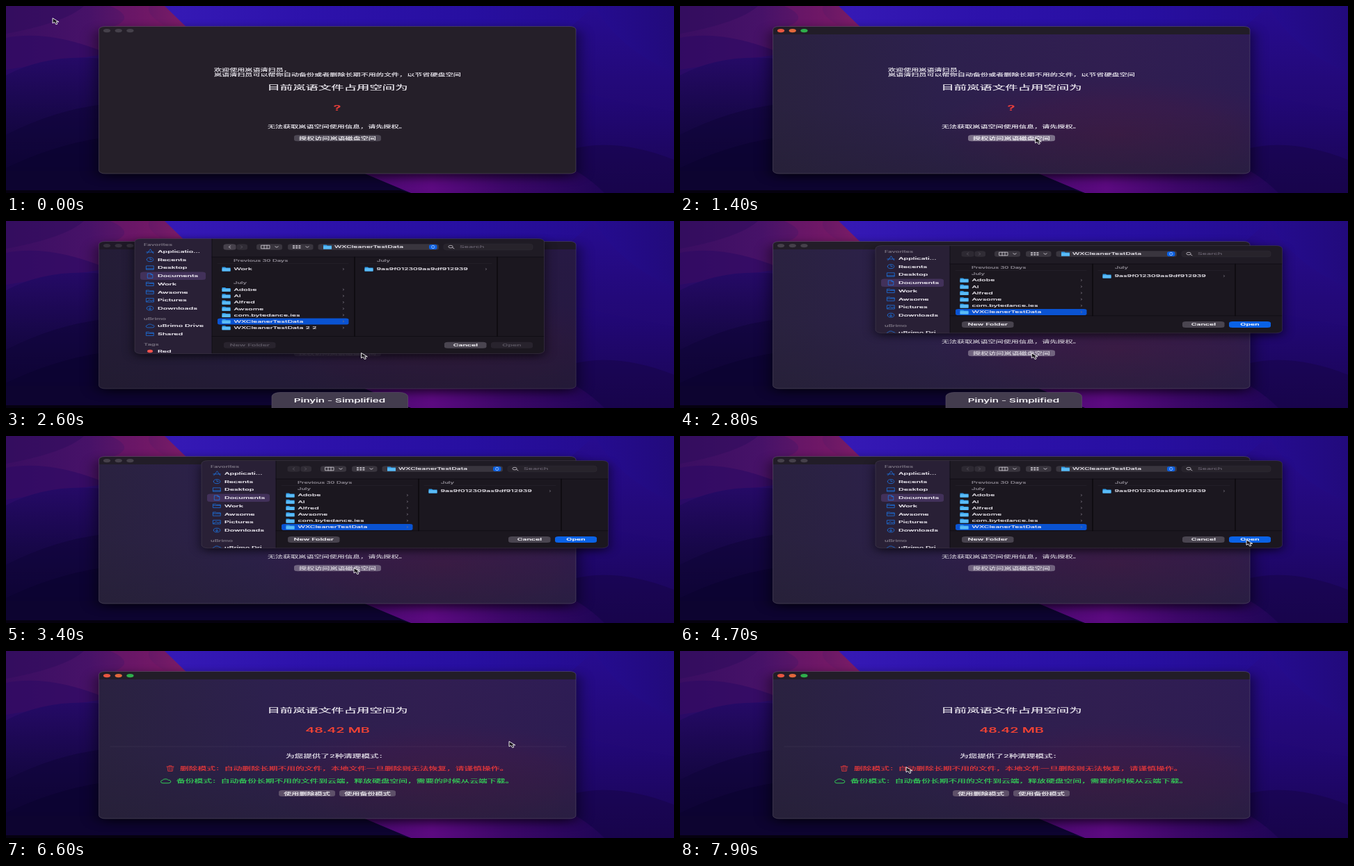
Animation, 960 px wide and 270 px high, one loop 8000 ms. Source, as an HTML page:

```html
<!DOCTYPE html>
<html lang="zh">
<head>
<meta charset="utf-8">
<title>Disk space cleaner</title>
<style>
html, body { margin: 0; width: 100%; height: 100%; overflow: hidden; background: #12063f; }
svg { display: block; width: 960px; height: 270px; }
text { font-family: Inter, "Noto Sans CJK SC", "Noto Sans CJK", sans-serif; white-space: pre; stroke-width: .14px; }
.mid { text-anchor: middle; }
</style>
</head>
<body>
<svg id="stage" viewBox="0 0 960 270" xmlns="http://www.w3.org/2000/svg"></svg>
<script>
const LOOP = 8000;
const BLUE = '#1c78ea';

// The screen is twice as wide as it should be, so all glyphs share one 2:1 scale.
const txt = (x, y, s, size, fill, attrs = '') =>
  `<text transform="translate(${x} ${y + size * 0.365}) scale(2 1)" font-size="${size}" fill="${fill}" stroke="${fill}" ${attrs}>${s}</text>`;
const mid = (x, y, s, size, fill, attrs = '') => txt(x, y, s, size, fill, 'class="mid" ' + attrs);
const box = (x, y, w, h, fill, r = 0, attrs = '') =>
  `<rect x="${x}" y="${y}" width="${w}" height="${h}" rx="${r}" ry="${r / 2}" fill="${fill}" ${attrs}/>`;
const shape = (d, fill, attrs = '') => `<path d="${d}" fill="${fill}" ${attrs}/>`;
const line = (d, color, width = 0.8) =>
  `<path d="${d}" fill="none" stroke="${color}" stroke-width="${width}" stroke-linejoin="round" stroke-linecap="round"/>`;
const at = (x, y, body) => `<g transform="translate(${x} ${y})">${body}</g>`;
const group = (id, body, attrs = '') => `<g id="${id}" ${attrs}>${body}</g>`;
const stops = list => list.map(([o, c, a = 1]) =>
  `<stop offset="${o}" stop-color="${c}" stop-opacity="${a}"/>`).join('');
const linear = (id, list, down) =>
  `<linearGradient id="${id}" x2="${down ? 0 : 1}" y2="${down ? 1 : 0}">${stops(list)}</linearGradient>`;
const radial = (id, cx, cy, r, list) =>
  `<radialGradient id="${id}" cx="${cx}" cy="${cy}" r="${r}">${stops(list)}</radialGradient>`;
const blur = (id, sd) =>
  `<filter id="${id}" x="-10%" y="-25%" width="120%" height="150%"><feGaussianBlur stdDeviation="${sd}"/></filter>`;
const clip = (id, body) => `<clipPath id="${id}">${body}</clipPath>`;

const OVAL = 'M-5 0a5 3.1 0 1 0 10 0a5 3.1 0 1 0 -10 0';
const FRAME = 'M-5.5 -2.8H5.5V2.8H-5.5z';
const ICON = {
  app: 'M-4.5 3L.5 -3.5L5 3M-5.5 1H5.5',
  clock: OVAL + 'M0 -2V0H2.5',
  desk: FRAME + 'M-5.5 1.4H5.5',
  doc: 'M-3.5 -3.5H1L4 -1.8V3.5H-3.5zM1 -3.5V-1.8H4',
  folder: 'M-5.5 -2.7H-1.5L-.5 -1.8H5.5V2.8H-5.5zM-5.5 -.6H5.5',
  pic: FRAME + 'M-5 2L-1 -.5L2 1.2L4 0L5.5 1',
  down: OVAL + 'M0 -1.6V1.5M-2 .4L0 1.6L2 .4',
  cloud: 'M-4.2 2.7a2.7 1.8 0 0 1 .2 -3.5a4 2.5 0 0 1 7.3 -.3a2.6 1.9 0 0 1 .9 3.8z',
  trash: 'M-5 -2.6H5M-2 -2.8V-3.8H2V-2.8M-4 -2.4L-3.2 3.8H3.2L4 -2.4M-1.3 -1V2.4M1.3 -1V2.4'
};
const icon = (name, x, y, color, k = 1) => at(x, y, `<g transform="scale(${k})">${line(ICON[name], color)}</g>`);
const folder = (x, y) => at(x, y,
  shape('M0 -2.9h4.4l1.5 .9h6.1v5.1h-12z', '#2f9be8') + box(0, -1.2, 12, 4.3, '#5bbcf7', 1));
const chev = (x, y, dir, color, k = 1) =>
  line(`M${x - dir * 1.3 * k} ${y - 1.7 * k}l${dir * 2.8 * k} ${1.7 * k}l${-dir * 2.8 * k} ${1.7 * k}`, color, 0.7);
const caret = (x, y) => line(`M${x - 2.2} ${y - 0.7}l2.2 1.4l2.2 -1.4`, '#d6d2da', 0.8);

function wallpaper() {
  return box(0, 0, 960, 270, 'url(#sky)')
    + shape('M846 0Q880 62 960 96V270H800V40z', 'url(#east)')
    + shape('M0 0H228L262 33L190 62L0 92z', 'url(#rose)')
    + shape('M0 0H112Q86 24 0 40z', '#2e0c5c', 'opacity=".5"')
    + shape('M150 0H206Q200 14 234 31H150Q190 18 150 0z', '#841a66', 'opacity=".3"')
    + shape('M0 46Q60 34 140 66V110H0z', '#300b64', 'opacity=".7"')
    + shape('M0 100Q60 68 140 76V270H0z', 'url(#west)')
    + shape('M0 186Q70 150 140 142V270H0z', '#10053a', 'opacity=".55"')
    + shape('M0 234Q70 200 140 190V270H0z', '#0a0330', 'opacity=".6"')
    + shape('M815 122Q880 138 960 152V270H500V238z', 'url(#dusk)')
    + shape('M815 206Q880 190 960 222V270H720z', '#170447', 'opacity=".5"')
    + shape('M0 238H508L582 270H0z', '#0d0430')
    + shape('M506 238L582 270H860Q840 250 819 238z', 'url(#plum)')
    + shape('M0 266H566L582 270H0z', '#05010f');
}

const windowBox = (fill, attrs = '') => box(133.5, 29.5, 685.5, 212.5, fill, 9, attrs);
const lights = colors => colors.map((c, i) =>
  `<ellipse cx="${145 + i * 16.7}" cy="35.6" rx="5.1" ry="2.6" fill="${c}"/>`).join('');
const button = (x, y, w, label, fill, attrs = '') =>
  box(x, y - 4.5, w, 9, fill, 5, attrs) + mid(x + w / 2, y, label, 5.55, '#f8f6fa');

function appWindow() {
  const frost = windowBox('url(#frost)') + windowBox('url(#glow)') + windowBox('url(#shade)')
    + shape('M133.5 41V34Q133.5 29.5 142 29.5H810Q819 29.5 819 34V41z', '#221d28');
  return windowBox('#000', 'opacity=".7" filter="url(#wide-soft)" transform="translate(0 5)"')
    + group('flat', windowBox('#251f29'))
    + group('frost-body', `<g clip-path="url(#win)">${frost}</g>`)
    + windowBox('none', 'stroke="#77727e" stroke-opacity=".55" stroke-width=".7"')
    + group('lights-off', lights(['#45404a', '#45404a', '#45404a']))
    + group('lights-on', lights(['#ea5640', '#e2683c', '#2fae4b']));
}

function firstPage() {
  const c = '#f0edf4';
  return txt(299, 92, '欢迎使用岚语清扫员，', 5.55, c)
    + txt(299, 98.7, '岚语清扫员可以帮你自动备份或者删除长期不用的文件，以节省硬盘空间', 5.55, c)
    + mid(476.5, 118, '目前岚语文件占用空间为', 9.2, c)
    + mid(476, 147, '?', 10, '#f4403a', 'font-weight="600"')
    + txt(376, 173.5, '无法获取岚语空间使用信息，请先授权。', 5.55, c)
    + button(414, 190.7, 125, '授权访问岚语磁盘空间', '#4c4753', 'id="grant"');
}

function secondPage() {
  const c = '#f0edf4', red = '#f03a3a', green = '#34d958';
  return mid(476.5, 86, '目前岚语文件占用空间为', 9.2, c)
    + mid(476.5, 114.8, '48.42 MB', 9.9, '#f64434', 'font-weight="500"')
    + line('M150 138H805', 'rgba(255,255,255,.07)', 0.7)
    + txt(402, 152, '为您提供了2种清理模式：', 6.3, c)
    + icon('trash', 236, 169.6, red)
    + txt(250, 169.8, '删除模式：自动删除长期不用的文件，本地文件一旦删除则无法恢复，请谨慎操作。', 6.39, red)
    + icon('cloud', 229.5, 187.6, green, 1.15)
    + txt(245, 187.6, '备份模式：自动备份长期不用的文件到云端，释放硬盘空间，需要的时候从云端下载。', 6.39, green)
    + button(392, 205.5, 81, '使用删除模式', '#5e5069')
    + button(479, 205.5, 81, '使用备份模式', '#5e5069');
}

const SIDE = [
  ['app', '', 18.5], ['clock', 'Recents', 30.2], ['desk', 'Desktop', 42], ['doc', 'Documents', 53.7],
  ['folder', 'Work', 65.4], ['folder', 'Awsome', 77.1], ['pic', 'Pictures', 88.8], ['down', 'Downloads', 100.5],
  ['cloud', '', 125.8], ['folder', 'Shared', 137.4]
];
const FILES = ['Adobe', 'AI', 'Alfred', 'Awsome', 'com.bytedance.ies', 'WXCleanerTestData', 'WXCleanerTestData 2 2'];

function sidebar(x, y, w, names) {
  const head = (s, dy) => txt(x + 13, y + dy, s, 4.7, '#77707f', 'font-weight="500"');
  let out = box(x, y, w, 170, '#292036') + box(x + 8, y + 48, w - 17, 11.4, '#42315a', 5) + head('Favorites', 8.7);
  let spare = 0;
  for (const [name, label, dy] of SIDE)
    out += icon(name, x + 22, y + dy, BLUE, 0.95)
      + txt(x + 33, y + dy, label || names[spare++], 5.35, '#f0edf4', 'font-weight="500"');
  return out + head('uBrimo', 116) + head('Tags', 152.6)
    + `<ellipse cx="${x + 22}" cy="${y + 162.5}" rx="4" ry="2.2" fill="#f4524d"/>`
    + txt(x + 33, y + 162.5, 'Red', 5.35, '#f0edf4', 'font-weight="500"');
}

function toolbar(m, y, ready) {
  const c = y + 12, field = '#39353e';
  let out = box(m + 16.5, c - 4.3, 18, 8.6, ready ? '#2d2932' : '#46414b', 5)
    + box(m + 35.5, c - 4.3, 15.5, 8.6, '#302c35', 5)
    + chev(m + 25.5, c, -1, ready ? '#5b5660' : '#c9c5cd') + chev(m + 42.5, c, 1, '#5b5660')
    + box(m + 64, c - 4.3, 37, 8.6, field, 5) + box(m + 109, c - 4.3, 36.5, 8.6, field, 5)
    + line(`M${m + 71} ${c - 2.3}h12v4.6h-12zm4 0v4.6m4 -4.6v4.6`, '#d6d2da', 0.8)
    + caret(m + 93, c) + caret(m + 137, c);
  for (let i = 0; i < 6; i++)
    out += box(m + 116 + i % 3 * 4.2, c - 2.3 + (i > 2 ? 2.7 : 0), 3, 1.7, '#c4c0c8');
  return out + box(m + 152.5, c - 4.3, 173.5, 8.6, field, 5) + folder(m + 160, c)
    + txt(m + 176, c, 'WXCleanerTestData', 5.25, '#f0edf4')
    + box(m + 312, c - 3.6, 11.5, 7.2, '#0b5fe0', 4)
    + line(`M${m + 315.5} ${c - 0.8}l2.2 -1.3l2.2 1.3m-4.4 1.6l2.2 1.3l2.2 -1.3`, '#fff', 0.7)
    + box(m + 333, c - 4.3, 128, 8.6, '#27232b', 5, 'stroke="#332e38" stroke-width=".5"')
    + `<ellipse cx="${m + 343}" cy="${c - 0.4}" rx="3.2" ry="1.8" fill="none" stroke="#c9c5cd" stroke-width=".8"/>`
    + line(`M${m + 345.5} ${c + 0.8}l2.5 1.5`, '#c9c5cd')
    + txt(m + 356, c, 'Search', 5.35, '#655f6c');
}

function panel(id, p) {
  const { x, y, m, h, ready } = p, right = m + 477.5, w = right - x, foot = y + h - 25;
  const frame = (fill, attrs = '') => box(x, y, w, h, fill, 9, attrs);
  const head = (hx, hy, s) => txt(hx, hy, s, 4.7, '#8a858f', 'font-weight="500"');
  const row = (rx, ry, s, end) => folder(rx, ry) + txt(rx + 17, ry, s, 5.3, '#f0edf4') + chev(end, ry, 1, '#77727d', 0.6);
  let list = head(m + 31, y + 31.4, 'Previous 30 Days') + head(m + 31, p.july, 'July')
    + box(m + 8, p.first + 41.4, 188.5, 9, '#0a53d2', 4);
  if (!ready) list += row(m + 14.5, y + 44, 'Work', m + 189);
  FILES.slice(0, ready ? 6 : 7).forEach((s, i) => list += row(m + 14.5, p.first + i * 9.2, s, m + 189));
  const push = (bx, bw, s, fill, color) =>
    box(bx, foot + 8.2, bw, 9, fill, 5) + mid(bx + bw / 2, foot + 12.7, s, 5.3, color, 'font-weight="500"');
  const body = frame('#1b171f') + sidebar(x, y, m - x, p.names)
    + box(m, y, 478, 26.5, '#1f1b24') + toolbar(m, y, ready)
    + line(`M${m} ${y + 26.5}H${right}M${m} ${foot}H${right}M${m} ${y}V${y + h}`, '#0f0c12', 0.8)
    + line(`M${m + 205} ${y + 26.5}V${foot}M${m + 410} ${y + 26.5}V${foot}`, '#08060a', 1.2)
    + line(`M${m + 8} ${y + 36}H${m + 196}M${m + 213} ${y + 36}H${m + 402}`, '#29252e', 0.5)
    + list + head(m + 237, y + 31.4, 'July')
    + row(m + 219.5, y + 44, '9as9f012309as9df912939', m + 394)
    + push(m + 17, 74.5, 'New Folder', ready ? '#48434e' : '#28232d', ready ? '#f1eef4' : '#5a5560')
    + push(m + 334, 60.5, 'Cancel', '#4a4550', '#f8f6fa')
    + push(m + 401, 60, 'Open', ready ? '#0a62e6' : '#28232d', ready ? '#fff' : '#5a5560');
  return clip(id + '-clip', frame('#000'))
    + group(id, frame('#000', 'opacity=".65" filter="url(#soft)" transform="translate(0 4)"')
      + `<g clip-path="url(#${id}-clip)">${body}</g>`
      + frame('none', 'stroke="#67606f" stroke-opacity=".5" stroke-width=".6"'));
}

const defs = '<defs>'
  + linear('sky', [[0, '#1d0b6a'], [0.25, '#3519b5'], [0.45, '#2d12ab'], [0.7, '#270fa0'], [0.88, '#250c90'], [1, '#220a7c']])
  + linear('east', [[0, '#270c90'], [0.4, '#23097a'], [1, '#1e0660']], true)
  + linear('rose', [[0, '#3a0e62'], [0.45, '#471268'], [0.8, '#681866'], [1, '#801c66']])
  + linear('west', [[0, '#250a66'], [0.45, '#170748'], [1, '#090327']], true)
  + linear('dusk', [[0, '#22087a'], [1, '#1a0552']], true)
  + linear('plum', [[0, '#46086c'], [0.3, '#5c0a80'], [0.6, '#3c0768'], [1, '#1f0556']])
  + linear('frost', [[0, '#2a2240'], [0.35, '#2d204e'], [0.7, '#311e52'], [1, '#2e1c55']])
  + linear('shade', [[0, '#241f33', 0], [0.55, '#241f33', 0.1], [1, '#241f33', 0.55]], true)
  + radial('glow', 0.72, 0.74, 0.4, [[0, '#4c1744', 0.6], [0.6, '#441848', 0.4], [1, '#3c1850', 0]])
  + clip('win', windowBox('#000'))
  + blur('soft', '9 6') + blur('wide-soft', '13 7') + '</defs>';

const arrow = shape('M0 0V7.4L2.7 5.8L4.7 9L6.9 8.4L5 5.4H8.8z', '#17131b',
  'stroke="#fff" stroke-width=".9" stroke-linejoin="round"');
const resize = shape('M-1 -1.2H4.6V-3L10 .5L4.6 4V2.2H-1z', '#17131b',
  'stroke="#fff" stroke-width=".9" stroke-linejoin="round"');

const stage = document.getElementById('stage');
stage.innerHTML = defs + wallpaper() + appWindow()
  + group('page1', firstPage()) + group('page2', secondPage())
  + group('dim', windowBox('#1c1626', 'opacity=".35"'))
  + panel('wide', { x: 185, y: 25.5, m: 296, h: 166, july: 89, first: 99, ready: false,
      names: ['Applicatio...', 'uBrimo Drive'] })
  + panel('low', { x: 281, y: 35.5, m: 388, h: 126.3, july: 76, first: 85.5, ready: true,
      names: ['Applicati...', 'uBrimo Dri...'] })
  + group('toast', box(382, 247.5, 195.5, 40, '#433c4e', 12, 'stroke="#5e5668" stroke-width=".6"')
      + mid(479.5, 259.6, 'Pinyin - Simplified', 7.6, '#f8f6fa', 'font-weight="500"'))
  + group('cursor', group('arrow', arrow) + group('resize', resize));

const el = id => document.getElementById(id);

// Spans of time, in ms, in which each part is on screen
const SHOWN = {
  'flat': [[0, 1400]],
  'frost-body': [[1400, LOOP]],
  'lights-off': [[0, 1400], [2300, 4900]],
  'lights-on': [[1400, 2300], [4900, LOOP]],
  'page1': [[0, 6500]],
  'page2': [[6500, LOOP]],
  'dim': [[2300, 2700]],
  'wide': [[2300, 2700]],
  'low': [[2700, 4900]],
  'toast': [[1900, 2900]],
  'arrow': [[0, 4900], [5300, LOOP]],
  'resize': [[4900, 5300]]
};

const PATH = [
  [0, 67, 17.5], [1300, 510.5, 190.5], [2600, 510.5, 190.5], [3000, 500, 190.5], [3700, 500, 190.5],
  [4600, 814, 150], [5200, 814, 150], [5500, 757, 141], [6400, 723, 130.5], [6900, 723, 130.5],
  [7200, 740, 138], [7800, 325, 167.5], [LOOP, 325, 167.5]
];

function pointer(t) {
  const i = PATH.findIndex(p => p[0] > t);
  const [t0, x0, y0] = PATH[i - 1], [t1, x1, y1] = PATH[i];
  const u = (t - t0) / (t1 - t0), k = u * u * (3 - 2 * u);
  return [x0 + (x1 - x0) * k, y0 + (y1 - y0) * k];
}

function render(ms) {
  const t = Math.floor((ms + 30) / 100) * 100 % LOOP;
  for (const id in SHOWN)
    el(id).style.display = SHOWN[id].some(([a, b]) => t >= a && t < b) ? '' : 'none';
  el('page1').style.opacity = t >= 2300 && t < 2700 ? 0.3 : t >= 2700 && t < 4900 ? 0.85 : 1;
  el('grant').setAttribute('fill', t < 1400 ? '#4c4753' : t < 4900 ? '#7c7189' : '#5e4d68');
  el('cursor').setAttribute('transform', `translate(${pointer(t)})`);
}

const start = performance.now();
function tick() {
  render(performance.now() - start);
  requestAnimationFrame(tick);
}
tick();
</script>
</body>
</html>
```
